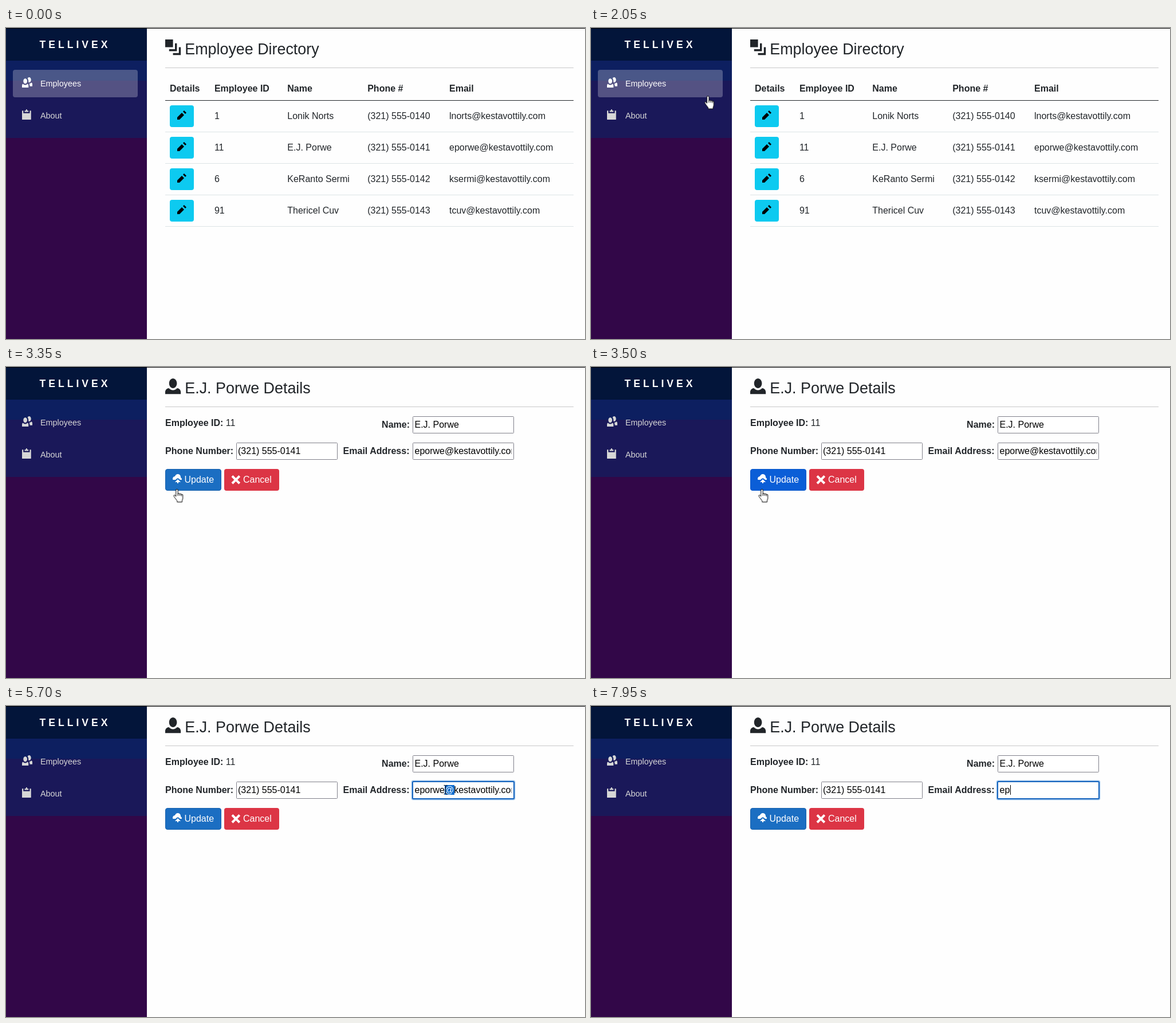
Animation of 1011x543 px, one loop 8000 ms. Source, as an HTML page:

```html
<!DOCTYPE html>
<html lang="en">
<head>
<meta charset="utf-8">
<title>Employee Directory</title>
<style>
html, body { margin: 0; width: 100%; height: 100%; overflow: hidden; background: #fefefe; }
svg { display: block; }
text { font: 16px "Liberation Sans", Arial, sans-serif; fill: #212529; white-space: pre; }
.bold { font-weight: bold; }
.title { font-size: 26.87px; }
.brand { font-size: 17.6px; font-weight: bold; letter-spacing: 5px; fill: #fff; }
.nav text { font-size: 14.4px; fill: inherit; }
.nav { fill: #d7d7d7; }
.white, .white text { fill: #fff; }
.value { fill: #000; }
.box { fill: #fff; stroke: #80808a; }

/* One loop is 8 s, so 1% is 80 ms. */
.step { animation: 8s step-end infinite; }
.list { animation-name: list; }
.details { animation-name: details; }
.employees { animation-name: employees; }
.press { animation-name: press; }
.update { animation: update 8s linear infinite; }
.cancel { animation-name: cancel; }
.email-box { animation-name: email-box; }
.focus { animation-name: focus; }
.mail { animation-name: mail; }
.caret { animation-name: caret; }
.pick-at { animation-name: pick-at; }
.pick-all { animation-name: pick-all; }
.key1 { animation-name: key1; }
.key2 { animation-name: key2; }
.pointer { animation: move 8s linear infinite; }
.arrow { animation-name: arrow; }
.hand { animation-name: hand; }
.beam { animation-name: beam; }
.arrow, .hand { fill: #fff; stroke: #000; stroke-linejoin: round; }
.beam { fill: none; }

@keyframes list { 0% { visibility: visible } 41.875%, 100% { visibility: hidden } }
@keyframes details { 0% { visibility: hidden } 41.875%, 100% { visibility: visible } }
@keyframes employees { 0% { fill: #fff } 41.875%, 100% { fill: #d7d7d7 } }
@keyframes press { 0%, 41.875%, 100% { opacity: 0 } 39.375% { opacity: 1 } }
@keyframes update {
  0%, 41.875%, 55.7%, 100% { fill: #1b6ec2; stroke: #1861ac }
  43.75%, 53.85% { fill: #0b5ed7; stroke: #0a58ca }
}
@keyframes cancel { 0%, 55.6%, 100% { fill: #dc3545 } 53.9% { fill: #bb2d3b } }
@keyframes email-box { 0%, 62.5%, 100% { stroke: #80808a } 57.6% { stroke: #46464c } }
@keyframes focus { 0% { opacity: 0 } 62.5%, 100% { opacity: 1 } }
@keyframes mail { 0% { opacity: 1 } 96.25%, 100% { opacity: 0 } }
@keyframes caret { 0%, 68.125%, 71.25%, 100% { opacity: 0 } 62.5%, 69.375% { opacity: 1 } }
@keyframes pick-at { 0%, 84.375%, 100% { opacity: 0 } 71.25% { opacity: 1 } }
@keyframes pick-all { 0%, 96.25%, 100% { opacity: 0 } 84.375% { opacity: 1 } }
@keyframes key1 { 0%, 99.375%, 100% { opacity: 0 } 96.25% { opacity: 1 } }
@keyframes key2 { 0% { opacity: 0 } 99.375%, 100% { opacity: 1 } }
@keyframes move {
  0%, 16.25% { transform: translate(232px, 0px) }
  22.5% { transform: translate(164.5px, 100px) }
  26.25%, 26.875% { transform: translate(212px, 122px) }
  30.625%, 52.5% { transform: translate(298.5px, 213px) }
  58.75%, 60% { transform: translate(655.5px, 157.5px) }
  62.5%, 100% { transform: translate(767px, 146px) }
}
@keyframes arrow {
  0%, 20.8%, 30.1%, 61.2%, 100% { opacity: 0 }
  16.25%, 26.25%, 55.6% { opacity: 1 }
}
@keyframes hand {
  0%, 26.25%, 55.6%, 100% { opacity: 0 }
  20.8%, 30.1% { opacity: 1 }
}
@keyframes beam {
  0%, 96.25%, 100% { opacity: 0; stroke: #000 }
  61.2% { opacity: 1; stroke: #000 }
  84.375% { opacity: 1; stroke: #fff }
}
</style>
</head>
<body>
<svg width="1011" height="543" viewBox="0 0 1011 543">
  <defs>
    <path id="people" d="M5.5 0c-.51 0-.95.35-1.22.88.45.54.72 1.28.72 2.13 0 .29-.03.55-.09.81.19.11.38.19.59.19.83 0 1.5-.9 1.5-2s-.67-2-1.5-2zm-3 1c-.83 0-1.5.9-1.5 2s.67 2 1.5 2 1.5-.9 1.5-2-.67-2-1.5-2zm4.75 3.16c-.43.51-1.02.82-1.69.84.27.38.44.84.44 1.34v.66h2v-1.66c0-.52-.31-.97-.75-1.19zm-6.5 1c-.44.22-.75.67-.75 1.19v1.66h5v-1.66c0-.52-.31-.97-.75-1.19-.45.53-1.06.84-1.75.84s-1.3-.32-1.75-.84z"/>
    <path id="clipboard" d="M3.5 0c-.28 0-.5.22-.5.5v.5h-.75c-.14 0-.25.11-.25.25v.75h3v-.75c0-.14-.11-.25-.25-.25h-.75v-.5c0-.28-.22-.5-.5-.5zm-3.25 1c-.14 0-.25.11-.25.25v6.5c0 .14.11.25.25.25h6.5c.14 0 .25-.11.25-.25v-6.5c0-.14-.11-.25-.25-.25h-.75v2h-5v-2z"/>
    <path id="layers" d="M0 0v4h4v-4zM5 2v3h-3v1h4v-4zM7 4v3h-3v1h4v-4z"/>
    <path id="person" d="M4 0c-1.1 0-2 1.12-2 2.5s.9 2.5 2 2.5 2-1.12 2-2.5-.9-2.5-2-2.5zm-2.09 5c-1.06.05-1.91.92-1.91 2v1h8v-1c0-1.08-.84-1.95-1.91-2-.54.61-1.28 1-2.09 1-.81 0-1.55-.39-2.09-1z"/>
    <path id="cloud" d="M4.5 0c-1.21 0-2.27.86-2.5 2-1.1 0-2 .9-2 2 0 .37.11.71.28 1h2.22l1-1c.28-.28.64-.41 1-.41s.72.12 1 .41l1 1h1.41c.06-.16.09-.32.09-.5 0-.65-.42-1.29-1-1.5v-.5c0-1.38-1.12-2.5-2.5-2.5zm0 4.5l-2.5 2.5h2v1h1v-1h2z"/>
    <path id="cross" d="M1.41 0L0 1.41 2.5 3.94 0 6.41 1.41 7.85 3.94 5.32 6.41 7.85 7.85 6.41 5.32 3.94 7.85 1.41 6.41 0 3.94 2.5z"/>
    <g id="edit">
      <rect x="286" y="135" width="42" height="38" rx="4" fill="#0dcaf0"/>
      <path transform="translate(299 144) scale(2)" d="M6 0l-1 1 2 2 1-1zM4 2l-4 4v2h2l4-4z"/>
    </g>
    <text id="address" x="713.5" y="152" style="fill:inherit">eporwe@kestavottily.com</text>
    <clipPath id="field"><rect x="713" y="134" width="169.7" height="26"/></clipPath>
    <clipPath id="at"><rect x="766" y="138" width="16.5" height="17"/></clipPath>
  </defs>

  <rect width="1011" height="543" fill="#fefefe"/>
  <rect width="246" height="543" fill="#320748"/>
  <rect width="246" height="192" fill="#1a1859"/>
  <rect width="246" height="92" fill="#0d1f60"/>
  <rect width="246" height="57" fill="#03153a"/>
  <rect width="1011" height="1" fill="#000"/>
  <text class="brand" x="58.5" y="35">TELLIVEX</text>

  <rect class="step list" x="12" y="73" width="218" height="48" rx="4" fill="#fff" fill-opacity=".25"/>
  <g class="nav step employees">
    <use href="#people" transform="translate(28 86) scale(2.25)"/>
    <text x="60" y="102">Employees</text>
  </g>
  <g class="nav">
    <use href="#clipboard" transform="translate(28 142) scale(2.25)"/>
    <text x="60" y="158">About</text>
  </g>

  <rect x="278" y="69" width="713" height="1" fill="#c8c8c9"/>

  <g class="step list">
    <use href="#layers" transform="translate(278 20) scale(3.4)" fill="#212529"/>
    <text class="title" x="312.3" y="46">Employee Directory</text>
    <text class="bold" y="111"><tspan x="286">Details</tspan><tspan x="363.9">Employee ID</tspan><tspan x="491.3">Name</tspan><tspan x="631.2">Phone #</tspan><tspan x="774">Email</tspan></text>
    <path d="M278 126.5h713" stroke="#212529"/>
    <path d="M278 181.5h713m-713 55h713m-713 55h713m-713 55h713" stroke="#dce3e6"/>
    <rect class="step press" x="282" y="186" width="50" height="46" rx="7" fill="#86d9f5"/>
    <use href="#edit"/>
    <use href="#edit" y="55"/>
    <use href="#edit" y="110"/>
    <use href="#edit" y="165"/>
    <text y="159"><tspan x="363.9">1</tspan><tspan x="491.3">Lonik Norts</tspan><tspan x="631.2">(321) 555-0140</tspan><tspan x="774">lnorts@kestavottily.com</tspan></text>
    <text y="214"><tspan x="363.9">11</tspan><tspan x="491.3">E.J. Porwe</tspan><tspan x="631.2">(321) 555-0141</tspan><tspan x="774">eporwe@kestavottily.com</tspan></text>
    <text y="269"><tspan x="363.9">6</tspan><tspan x="491.3">KeRanto Sermi</tspan><tspan x="631.2">(321) 555-0142</tspan><tspan x="774">ksermi@kestavottily.com</tspan></text>
    <text y="324"><tspan x="363.9">91</tspan><tspan x="491.3">Thericel Cuv</tspan><tspan x="631.2">(321) 555-0143</tspan><tspan x="774">tcuv@kestavottily.com</tspan></text>
  </g>

  <g class="step details">
    <use href="#person" transform="translate(278 20) scale(3.4)" fill="#212529"/>
    <text class="title" x="312.3" y="46">E.J. Porwe Details</text>
    <text class="bold" x="278" y="103">Employee ID:</text>
    <text x="383.8" y="103">11</text>
    <text class="bold" x="656.1" y="106">Name:</text>
    <text class="bold" x="278" y="152">Phone Number:</text>
    <text class="bold" x="588.6" y="152">Email Address:</text>
    <rect class="box" x="710.5" y="86.5" width="176" height="29" rx="1"/>
    <rect class="box" x="402.5" y="132.5" width="176" height="29" rx="1"/>
    <rect class="box step email-box" x="710.5" y="132.5" width="176" height="29" rx="1"/>
    <text class="value" x="713.5" y="106">E.J. Porwe</text>
    <text class="value" x="405" y="152">(321) 555-0141</text>

    <g class="step focus">
      <rect x="707.5" y="129.5" width="182" height="35" rx="4" fill="#a8cbee"/>
      <rect x="710" y="132" width="177" height="30" rx="1.5" fill="#fff" stroke="#1463bd" stroke-width="2"/>
    </g>
    <g clip-path="url(#field)">
      <use class="step mail" href="#address" fill="#000"/>
    </g>
    <rect class="step caret" x="766" y="138" width="1" height="17"/>
    <g class="step pick-at" clip-path="url(#at)">
      <rect x="766" y="138" width="17" height="17" fill="#0c6bce"/>
      <use href="#address" fill="#fff"/>
    </g>
    <g class="step pick-all">
      <rect x="714" y="138" width="169" height="17" fill="#0c6bce"/>
      <g clip-path="url(#field)"><use href="#address" fill="#fff"/></g>
    </g>
    <g class="step key1">
      <text class="value" x="713.5" y="152">e</text>
      <rect x="723" y="138" width="1" height="17"/>
    </g>
    <g class="step key2">
      <text class="value" x="713.5" y="152">ep</text>
      <rect x="732" y="138" width="1" height="17"/>
    </g>

    <rect class="update" x="278.5" y="178.5" width="97" height="37" rx="3.5"/>
    <rect class="step cancel" x="381" y="178" width="96" height="38" rx="4"/>
    <g class="white">
      <use href="#cloud" transform="translate(291 187) scale(2)"/>
      <text x="311.5" y="202">Update</text>
      <use href="#cross" transform="translate(393.5 189) scale(2)"/>
      <text x="414" y="202">Cancel</text>
    </g>
  </g>

  <g class="pointer">
    <path class="step arrow" d="M0 0V16.5L3.8 12.9 6.2 18.5 8.7 17.4 6.3 12H11.5z"/>
    <g class="step hand">
      <path transform="translate(-6.3 0)" d="M4.5 13V2.3a1.8 1.8 0 0 1 3.6 0V9q0-1.3 1.6-1.3T11.3 9.3q.1-1 1.5-1T14.2 10q.2-.7 1.2-.7 1.1 0 1.1 1.7V16q0 2-1.2 4v2.8H6.6V20.5Q4.5 18 2.6 15.2L.8 12.4q-.5-1 .4-1.6 1-.6 2 .5z"/>
      <path d="M1.8 8.5v3.5M5 9.3V12M7.9 10v2.5"/>
    </g>
    <path class="step beam" d="M-2.5-7.5h2l1 1 1-1h2M.5-6.5v13M-2.5 7.5h2l1-1 1 1h2"/>
  </g>
</svg>
</body>
</html>
```
